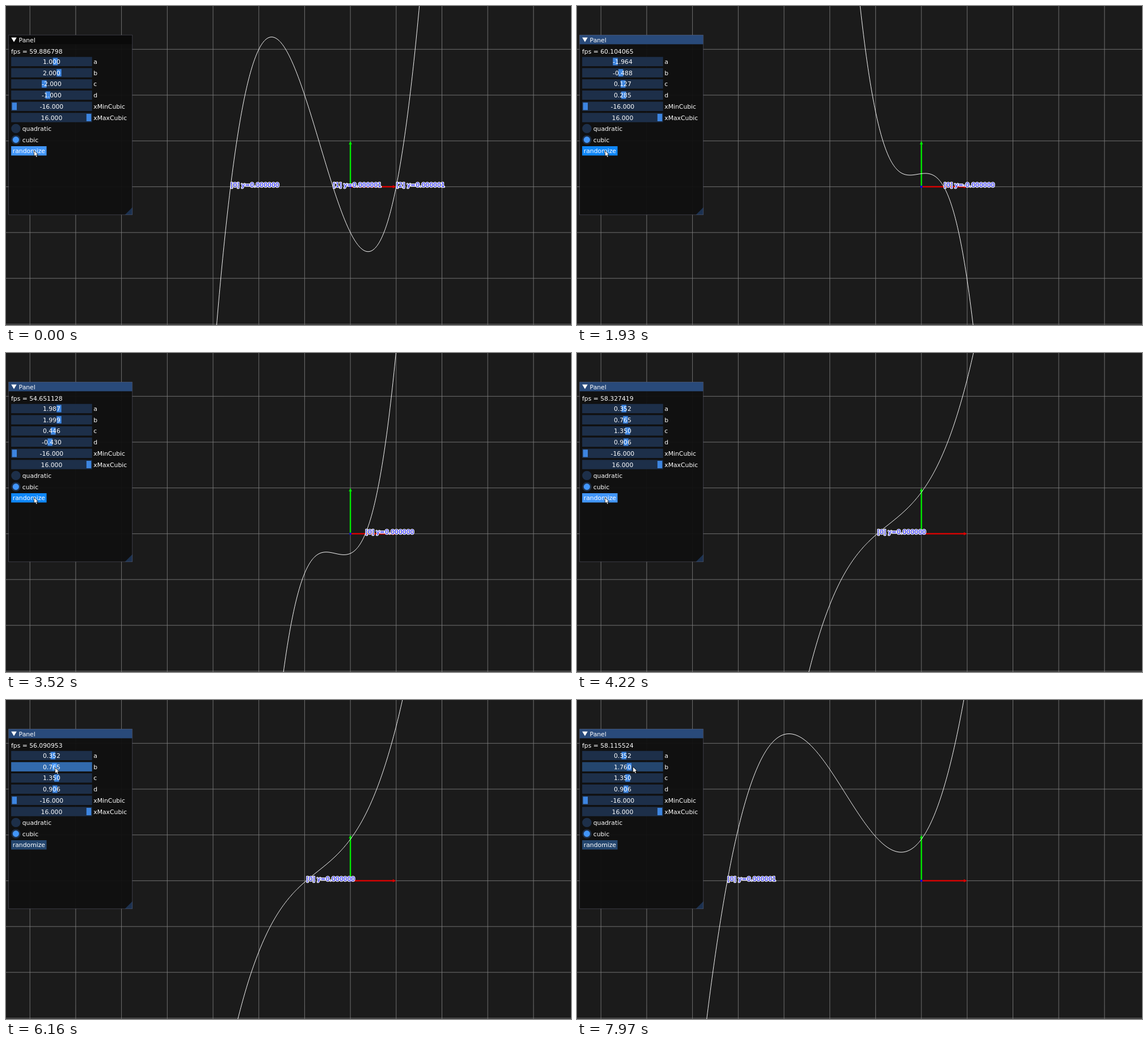
Recreate the animation shown at these times as an HTML page with a canvas. Size 996x562 px, loop 8000 ms.

```html
<!DOCTYPE html>
<html lang="en">
<head>
<meta charset="utf-8">
<title>Cubic roots</title>
<style>
html, body { margin: 0; width: 100%; height: 100%; overflow: hidden; background: #1b1b1b; }
canvas { display: block; }
</style>
</head>
<body>
<canvas id="stage" width="996" height="562"></canvas>
<script>
const ctx = document.getElementById('stage').getContext('2d');
const W = 996, H = 562, LOOP = 8000;
const OX = 607.1, OY = 318.4, UNIT = 80.7;
const FONT = '10.8px "DejaVu Sans", Verdana, sans-serif';
const ROW_Y = 97.9, ROW_STEP = 19.72, ROW_H = 16.4;
const ZERO = '0.000000', NEG = '-0.000000', EPS = '0.000001';

// time, coefficients a b c d, residuals shown beside the roots
const curves = [
  [0, [1, 2, -2, -1], [ZERO, EPS, EPS]],
  [480, [1.2, -0.604, -1.103, 0.897], [ZERO]],
  [720, [0.34, -0.081, -0.599, 1.584], [NEG]],
  [960, [-0.803, 1.097, 0.704, -1.302], [ZERO]],
  [1330, [0.25, -0.4, 0.2, 1.735], [NEG]],
  [1570, [1.448, 0.903, -1.604, -0.352], [ZERO]],
  [1810, [-1.964, -0.488, 0.127, 0.285], [NEG]],
  [2050, [-1.704, 0.398, 0.902, 0.247], [ZERO]],
  [2290, [0.902, -1.304, 0.397, 1.096], [NEG]],
  [2530, [-0.618, -1.703, 0.352, 1.396], [ZERO]],
  [2710, [1.703, 0.796, 1.104, -0.198], [ZERO]],
  [3060, [1.397, 1.504, 0.203, 0.702], [NEG]],
  [3270, [1.987, 1.999, 0.446, -0.43], [ZERO]],
  [3640, [1.853, -0.397, 1.604, 0.548], [ZERO]],
  [3980, [-1.302, -1.198, -0.904, 0.097], [ZERO]],
  [4220, [0.352, 0.765, 1.35, 0.906], [ZERO]],
  [7480, [0.352, 1.76, 1.35, 0.906], [EPS]]
];

// dragging b down, then up
const drags = [
  [6160, 0.765], [6280, 0.511], [6400, 0.257], [6640, 0.462], [6760, 0.765], [6880, 0.995],
  [7000, 1.222], [7120, 1.374], [7240, 1.525], [7360, 1.642], [7480, 1.76]
];

const presses = [
  [360, 480], [600, 720], [1210, 1330], [1450, 1570], [1690, 1810], [1930, 2050], [2170, 2290],
  [2410, 2530], [2650, 2710], [2960, 3060], [3520, 3640], [3860, 3980], [4100, 4220]
];

const rates = [
  [0, '59.886798'], [240, '59.417324'], [720, '58.444792'], [1210, '60.381275'],
  [1690, '60.104065'], [2170, '59.260418'], [2710, '57.913506'], [3270, '54.651128'],
  [3860, '58.327419'], [4340, '60.217341'], [4830, '58.904621'], [5320, '59.788588'],
  [5800, '56.090953'], [6280, '59.350712'], [6760, '60.042837'], [7240, '59.618203'],
  [7860, '58.115524']
];

const pointer = [
  [0, 49.3, 254.6], [5320, 78, 207], [5440, 82, 182], [5560, 84, 161], [5680, 85.5, 142],
  [5800, 86, 127], [5920, 86.5, 119], [7860, 95, 118], [7970, 98.6, 117.6]
];

const at = (track, t) => track.findLast(key => key[0] <= t);
const sliderX = (v, range) => 80.4 + v / range * 65.6;

function rect(x, y, w, h, color) {
  ctx.fillStyle = color;
  ctx.fillRect(x, y, w, h);
}

function text(str, x, y, align = 'left') {
  ctx.textAlign = align;
  ctx.fillStyle = '#fff';
  ctx.fillText(str, x, y);
}

function shape(points, color) {
  ctx.beginPath();
  points.forEach(([x, y]) => ctx.lineTo(x, y));
  ctx.closePath();
  ctx.fillStyle = color;
  ctx.fill();
}

function disc(x, y, r, color) {
  ctx.beginPath();
  ctx.arc(x, y, r, 0, Math.PI * 2);
  ctx.fillStyle = color;
  ctx.fill();
}

function drawGrid() {
  ctx.beginPath();
  for (let i = -7; i <= 4; i++) {
    ctx.moveTo(OX + i * UNIT, 0);
    ctx.lineTo(OX + i * UNIT, H);
  }
  for (let i = -3; i <= 3; i++) {
    ctx.moveTo(0, OY + i * UNIT);
    ctx.lineTo(W, OY + i * UNIT);
  }
  ctx.strokeStyle = '#808080';
  ctx.lineWidth = 0.85;
  ctx.stroke();
}

function drawAxes() {
  const tip = UNIT;
  rect(OX, OY - 1.2, tip - 4, 2.4, '#dc0000');
  shape([[OX + tip, OY], [OX + tip - 6, OY - 2.8], [OX + tip - 6, OY + 2.8]], '#dc0000');
  rect(OX - 1.2, OY - tip + 4, 2.4, tip - 4, '#00eb00');
  shape([[OX, OY - tip], [OX - 2.8, OY - tip + 6], [OX + 2.8, OY - tip + 6]], '#00eb00');
  rect(OX - 1.8, OY - 1.8, 3.6, 3.6, '#0000e0');
}

function findRoots(f) {
  const roots = [];
  const step = 0.0173;
  for (let x = -16; x < 16; x += step) {
    if (f(x) * f(x + step) > 0) continue;
    let lo = x, hi = x + step;
    for (let i = 0; i < 24; i++) {
      const mid = (lo + hi) / 2;
      if (f(lo) * f(mid) <= 0) hi = mid; else lo = mid;
    }
    roots.push(lo);
  }
  return roots;
}

function drawCurve([a, b, c, d], residuals) {
  const f = x => ((a * x + b) * x + c) * x + d;
  ctx.beginPath();
  for (let px = 0; px <= W; px++) ctx.lineTo(px, OY - f((px - OX) / UNIT) * UNIT);
  ctx.strokeStyle = '#fff';
  ctx.lineWidth = 0.95;
  ctx.lineJoin = 'round';
  ctx.stroke();

  ctx.textAlign = 'left';
  findRoots(f).forEach((root, i) => {
    const label = `[${i}] y=${residuals[i] || ZERO}`;
    const x = OX + root * UNIT + 0.2;
    ctx.lineWidth = 2.7;
    ctx.strokeText(label, x, 318.7);
    ctx.fillStyle = '#00f';
    ctx.fillText(label, x, 318.7);
  });
}

function drawSlider(row, name, value, range, state) {
  const y = ROW_Y + row * ROW_STEP;
  const back = { idle: '#1d2f49', hover: '#24466e', active: '#326aad' }[state];
  rect(9.1, y - ROW_H / 2, 142.6, ROW_H, back);
  rect(sliderX(value, range) - 4.2, y - 6.5, 8.4, 13, state === 'active' ? '#4296fa' : '#3d85e0');
  text(value.toFixed(3), 80.4, y + 4, 'center');
  text(name, 154.3, y + 4);
}

function drawRadio(y, name, on) {
  disc(17.4, y, 8.2, '#1d2f49');
  if (on) disc(17.4, y, 5.6, '#4296fa');
  text(name, 28.7, y + 4.2);
}

function drawPanel(t, coeffs, cursor) {
  const dragging = t >= 6040 && t < 7860;
  rect(4.5, 51, 218, 316.8, 'rgba(15,15,15,0.94)');
  rect(4.5, 51, 218, 16.4, t < 360 ? '#0a0a0a' : '#294a7a');
  shape([[223, 354.5], [223, 368], [209.5, 368]], '#1c3150');
  ctx.strokeStyle = 'rgba(110,110,128,0.5)';
  ctx.lineWidth = 0.9;
  ctx.strokeRect(4.5, 51.2, 218.2, 316.6);
  shape([[9.2, 55.4], [18.8, 55.4], [14, 63.6]], '#fff');
  text('Panel', 22.6, 63.5);
  text('fps = ' + at(rates, t)[1], 9, 84);

  const sliders = [
    ['a', coeffs[0], 10], ['b', coeffs[1], 10], ['c', coeffs[2], 10], ['d', coeffs[3], 10],
    ['xMinCubic', -16, 16], ['xMaxCubic', 16, 16]
  ];
  sliders.forEach(([name, value, range], row) => {
    const over = Math.abs(cursor.y - ROW_Y - row * ROW_STEP) < ROW_H / 2;
    const state = dragging && row === 1 ? 'active' : over ? 'hover' : 'idle';
    drawSlider(row, name, value, range, state);
  });

  drawRadio(215.9, 'quadratic', false);
  drawRadio(235.6, 'cubic', true);

  const pressed = presses.some(([from, to]) => t >= from && t < to);
  rect(9.1, 247, 62.4, ROW_H, pressed ? '#0f87fa' : cursor.y > 247 ? '#4296fa' : '#24466e');
  text('randomize', 11.8, 259.2);
}

function drawCursor({ x, y }) {
  const outline = [[0, 0], [0, 10.4], [2.4, 8.2], [4, 11.8], [5.9, 11], [4.4, 7.5], [7.4, 7.3]];
  shape(outline.map(([dx, dy]) => [x + dx, y + dy]), '#fff');
  ctx.strokeStyle = '#000';
  ctx.lineWidth = 0.8;
  ctx.stroke();
}

function draw(t) {
  let [, coeffs, residuals] = at(curves, t);
  let [, x, y] = at(pointer, t);
  if (t >= 6160) {
    const b = at(drags, t)[1];
    coeffs = [coeffs[0], b, coeffs[2], coeffs[3]];
    if (t < 7860) x = sliderX(b, 10) + 1;
  }
  const cursor = { x, y };
  ctx.font = FONT;
  ctx.textBaseline = 'alphabetic';
  rect(0, 0, W, H, '#1b1b1b');
  drawGrid();
  drawAxes();
  drawCurve(coeffs, residuals);
  drawPanel(t, coeffs, cursor);
  drawCursor(cursor);
}

function tick() {
  draw(performance.now() % LOOP);
  requestAnimationFrame(tick);
}
tick();
</script>
</body>
</html>
```
